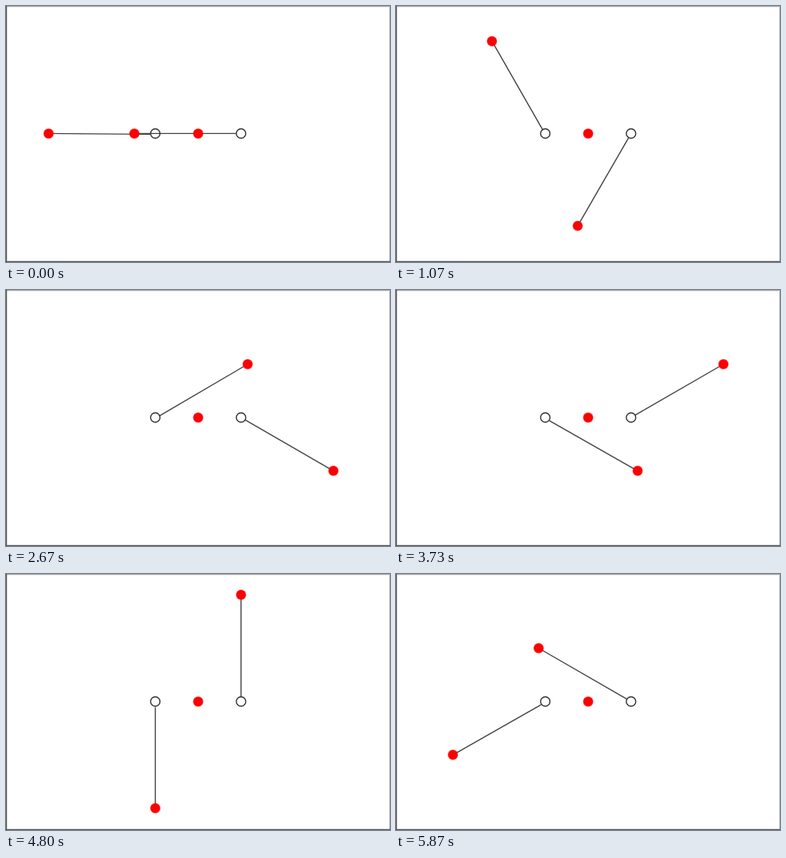
Recreate the animation shown at these times as an HTML page with a canvas. Size 480 by 320 pixels, loop 6.39 s.

```html
<!DOCTYPE html>
<html>
<head>
<meta charset="utf-8">
<style>
html, body { margin: 0; width: 100%; height: 100%; overflow: hidden; background: #fff; }
canvas { display: block; }
</style>
</head>
<body>
<canvas id="stage" width="480" height="320"></canvas>
<script>
const ctx = document.getElementById('stage').getContext('2d');
const LOOP = 6390, STEPS = 12, STEP_MS = 1600 / 3;
const MID_X = 240.2, MID_Y = 159.4, OFFSET = 53.6, ARM = 400 / 3, R = 6;

function circle(x, y, r) {
  ctx.beginPath();
  ctx.arc(x, y, r, 0, 2 * Math.PI);
}

function disc(x, y) {
  ctx.fillStyle = '#fa0202';
  circle(x, y, R);
  ctx.fill();
  // soft rim
  ctx.fillStyle = 'rgba(250, 2, 2, 0.4)';
  circle(x, y, R + 0.7);
  ctx.fill();
}

function ring(x, y) {
  ctx.strokeStyle = '#333';
  ctx.lineWidth = 1.4;
  circle(x, y, R - 0.1);
  ctx.stroke();
}

// The rod runs from the ring's edge to the weight; sag lowers its inner end.
function rod(x, angle, sag) {
  const c = Math.cos(angle), s = Math.sin(angle);
  ctx.strokeStyle = '#444';
  ctx.lineWidth = 1.4;
  ctx.beginPath();
  ctx.moveTo(x + R * c, MID_Y + R * s + sag);
  ctx.lineTo(x + ARM * c, MID_Y + ARM * s);
  ctx.stroke();
}

function border() {
  ctx.fillStyle = '#aaa';
  ctx.fillRect(0, 0, 480, 1.2);
  ctx.fillStyle = '#bbb';
  ctx.fillRect(479, 0, 1, 320);
  ctx.fillStyle = '#555';
  ctx.fillRect(0, 0, 1.2, 320);
  ctx.fillRect(0, 318.8, 480, 1.2);
}

function draw(ms) {
  // Step times are rounded to 10 ms; the small lead covers the rounding.
  const step = Math.min(STEPS - 1, Math.floor((ms % LOOP + 4) / STEP_MS));
  const turn = step * 2 * Math.PI / STEPS;
  const arms = [
    { x: MID_X - OFFSET, angle: Math.PI + turn, sag: 1 },
    { x: MID_X + OFFSET, angle: Math.PI - turn, sag: 0 }
  ];
  ctx.fillStyle = '#fff';
  ctx.fillRect(0, 0, 480, 320);
  border();
  for (const a of arms) rod(a.x, a.angle, a.sag);
  for (const a of arms) {
    ring(a.x, MID_Y);
    disc(a.x + ARM * Math.cos(a.angle), MID_Y + ARM * Math.sin(a.angle));
  }
  disc(MID_X, MID_Y);
}

const start = performance.now();
function tick() {
  draw(performance.now() - start);
  requestAnimationFrame(tick);
}
tick();
</script>
</body>
</html>
```
